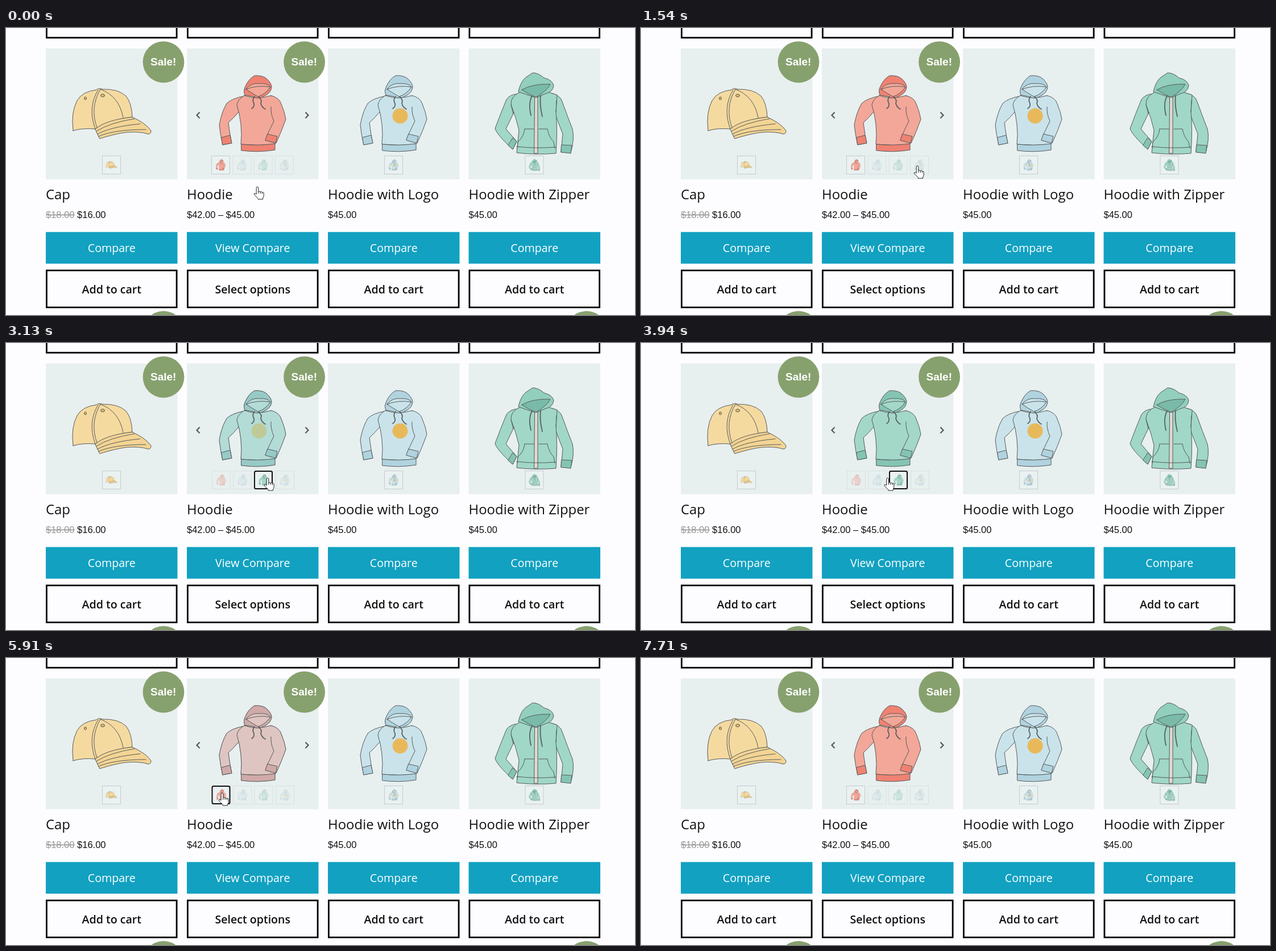
Write an HTML page that moves like this. It is 1106 px wide and 506 px high and loops after 7.75 s.

```html
<!DOCTYPE html>
<html lang="en">
<head>
<meta charset="utf-8">
<title>Shop</title>
<style>
html, body { margin: 0; width: 100%; height: 100%; overflow: hidden; background: #fdfdff; }
svg { display: block; }
text { font-family: "Open Sans", "Noto Sans", sans-serif; fill: #111; }
.title { font-size: 23.9px; }
.price, .sale { font-family: "Liberation Sans", Arial, sans-serif; }
.price { font-size: 16.5px; }
.old { fill: #999; text-decoration: line-through; }
.sale { font-size: 19px; font-weight: 700; fill: #fff; }
.button { font-size: 19.6px; text-anchor: middle; }
.art { stroke: #565b5c; stroke-width: 1; stroke-linejoin: round; stroke-linecap: round; }
.line { fill: none; }
.cord { fill: none; stroke-width: 1.7; }
</style>
</head>
<body>
<svg id="stage" width="1106" height="506" viewBox="0 0 1106 506"></svg>
<script>
const LOOP = 7750, SIZE = 231.5, TOP = 36;
const COLS = [70, 318, 566, 813.5];
const THUMBS = [361, 398.5, 435.5, 473];

const path = (d, fill) => `<path d="${d}" ${fill ? `fill="${fill}"` : 'class="line"'}/>`;
const cord = d => `<path d="${d}" class="cord"/>`;
const use = (id, x, y, scale = 1) =>
  `<use href="#${id}" transform="translate(${x} ${y}) scale(${scale})"/>`;
const art = (id, x, body) =>
  `<g id="${id}" class="art"><g transform="translate(${-x} ${-TOP})">${body}</g></g>`;

function hoodie(id, light, dark, badge) {
  return art(id, COLS[1],
    path('M419 120Q397 124 388 133Q379 148 375 171Q377 190 381 206L397 203Q394 190 391 167Q401 158 410 147Z', light) +
    path('M379 193L394 189L397 203L381 206Z', dark) +
    path('M419 119Q407 126 406 136Q411 151 413 170Q415 188 413 205Q443 208 473 205Q473 160 469 140L466 119Q441 127 419 119Z', light) +
    path('M414 205Q443 208 473 204L473 215Q443 220 414 216Z', dark) +
    path('M466 119Q481 123 484 134Q490 148 492 161Q485 181 475 203L457 198L460 187L471 164Q465 151 466 139', light) +
    path('M460 187L477 191L474 203L456 198Z', dark) +
    path('M420 118Q417 112 420 105Q426 90 437 84Q452 83 459 90Q467 98 467 104Q466 114 456 119Q444 127 434 121Z', dark) +
    path('M422 108Q431 96 446 98Q460 97 465 104Q456 117 443 121Q431 114 422 108Z', light) +
    path('M422 108Q442 100 465 104') +
    cord('M437 121Q432 127 436 133Q437 139 432 142M444 121Q451 127 448 133Q450 140 456 143') +
    (badge ? '<circle cx="445" cy="155" r="13.5" fill="#e8b95a" stroke="none"/>' : ''));
}

const zipHoodie = art('zip', COLS[3],
  path('M900 116Q886 117 880 126Q870 150 860 177Q862 187 891 214L898 200L879 178L892 151Z', '#a0d7c7') +
  path('M891 194L898 200L891 214L883 207Z', '#84c4b2') +
  path('M960 115Q975 119 978 130Q987 155 996 178Q1000 195 993 220L976 219L979 187L966 153Z', '#a0d7c7') +
  path('M977 206L995 207L993 221L976 219Z', '#84c4b2') +
  path('M904 113Q887 120 888 135Q897 158 902 180L898 220Q932 224 967 221Q970 178 967 148L969 118L950 112Z', '#a0d7c7') +
  path('M901 112Q905 94 914 87L926 79Q936 79 946 88Q960 91 963 101Q962 113 948 116L932 123L914 117Z', '#92cfbd') +
  path('M907 109Q925 98 957 99Q951 111 932 122Q917 116 907 109Z', '#79bba8') +
  path('M930 122L935 122L935 221L929 221Z', '#e2d9d2') +
  path('M912 178L928 178M912 178Q911 191 900 201L899 212M937 178L952 178Q954 191 963 201L965 212' +
    'M898 209Q931 213 967 210M888 135L892 151M967 148L968 128') +
  cord('M925 120Q918 132 923 154M940 119Q938 135 943 156'));

const cap = art('cap', COLS[0],
  path('M118 181Q114 149 125 128Q134 112 159 109Q163 105 170 108Q197 107 211 120Q221 132 222 157Q190 160 157 178Q135 176 118 181Z', '#f5daa0') +
  path('M157 178Q176 162 222 157Q246 168 255 181Q255 187 250 187Q236 182 211 184Q190 187 165 195Z', '#f3d494') +
  path('M162 109Q143 140 157 178M166 108Q147 140 160 176M166 108Q199 120 206 158M159 182Q182 167 226 160' +
    'M161 187Q184 174 236 169M163 191Q190 179 246 179') +
  '<ellipse cx="139.5" cy="124" rx="2" ry="2.5" fill="#e0b868"/><ellipse cx="170" cy="119" rx="3.5" ry="2.5" fill="#e0b868"/>');

const badge = (x, y) => `<circle cx="${x}" cy="${y}" r="36.4" fill="#87a16e"/>`;
const sale = x => badge(x, 60) + `<text class="sale" x="${x - 23}" y="66.3">Sale!</text>`;
const thumb = (id, x) =>
  `<rect x="${x + .5}" y="225.5" width="32" height="32" fill="#eaf1f1" stroke="#c5cccd"/>` + use(id, x, 225, .143);
const chevron = (x, dir) =>
  `<path d="M${x - 2.5 * dir} 148.5l${5 * dir} 5.2l${-5 * dir} 5.2" fill="none" stroke="#54585c" stroke-width="2.2"/>`;

function product(i, name, price, compare, action) {
  const x = COLS[i], mid = x + SIZE / 2;
  const box = y => `<rect x="${x + 1.4}" y="${y + 1.4}" width="${SIZE - 2.8}" height="65.2" fill="none" stroke="#000" stroke-width="2.8"/>`;
  return box(-49.5) + box(426) +
    `<rect x="${x}" y="${TOP}" width="${SIZE}" height="230.7" fill="#e8efef"/>
    <text class="title" x="${x}" y="301.5">${name}</text>
    <text class="price" x="${x}" y="334.5">${price}</text>
    <rect x="${x}" y="359.7" width="${SIZE}" height="55.8" fill="#12a1c1"/>
    <text class="button" x="${mid}" y="395.3" style="fill:#fff">${compare}</text>
    <text class="button" x="${mid}" y="468" font-weight="600">${action}</text>`;
}

const SLIDES = ['red', 'blue', 'green', 'logo'];
const stage = document.getElementById('stage');
stage.innerHTML = `<defs>
  ${hoodie('red', '#f3a798', '#ef8272')}${hoodie('blue', '#cae3ea', '#b0d3df')}
  ${hoodie('green', '#a3d8c9', '#84c4b3')}${hoodie('logo', '#cae3ea', '#b0d3df', true)}
  ${zipHoodie}${cap}</defs>` +
  product(0, 'Cap', '<tspan class="old">$18.00</tspan> $16.00', 'Compare', 'Add to cart') +
  product(1, 'Hoodie', '$42.00 – $45.00', 'View Compare', 'Select options') +
  product(2, 'Hoodie with Logo', '$45.00', 'Compare', 'Add to cart') +
  product(3, 'Hoodie with Zipper', '$45.00', 'Compare', 'Add to cart') +
  use('cap', COLS[0], TOP) + use('logo', COLS[2], TOP) + use('zip', COLS[3], TOP) +
  thumb('cap', 169) + thumb('logo', 665) + thumb('zip', 912.5) +
  SLIDES.map(id => `<g class="slide">${use(id, COLS[1], TOP)}</g>`).join('') +
  chevron(338, -1) + chevron(529, 1) +
  SLIDES.map((id, i) => `<g class="thumb">${thumb(id, THUMBS[i])}</g>`).join('') +
  `<rect id="focus" y="226" width="31" height="31" rx="2.5" fill="none" stroke="#111" stroke-width="2"/>` +
  sale(277) + sale(524.6) + badge(277, 535.5) + badge(1020.6, 535.5) +
  `<g id="hand" stroke="#222" stroke-width="1" stroke-linejoin="round">
    <path fill="#fff" d="M-1.8 13V1.8a1.8 1.8 0 0 1 3.6 0V8.5q1.8-1.6 3.4.4 1.8-1.2 3.2.6 2.4-.8 2.8 1.6V15.5q0 2.5-1.6 4.5V22H1.2V20.5L-5.6 13.6q-.6-2.8 1.8-1.8z"/>
    <path fill="none" d="M1.8 8.5V12M5.2 9V12M8.4 10V12.5"/></g>`;

const slides = stage.querySelectorAll('.slide'), thumbs = stage.querySelectorAll('.thumb');
const focus = document.getElementById('focus'), hand = document.getElementById('hand');

// Clicks: time, chosen slide
const CLICKS = [[-1000, 0], [1790, 3], [2960, 2], [4530, 1], [5760, 0]];
const FADE = 300, BLUR = 7420;
// Pointer stops: time, x, y of the fingertip
const MOVES = [[130, 442, 280], [780, 486, 243], [2250, 486, 243], [2800, 460, 238], [3550, 460, 238],
  [4250, 415, 238], [5050, 415, 238], [5550, 380, 238], [6350, 380, 238], [7050, 392, 512]];

const clamp = v => Math.max(0, Math.min(1, v));
const ease = v => v * v * (3 - 2 * v);

function pointer(t) {
  const last = MOVES.at(-1);
  if (t >= last[0]) return last.slice(1);
  const i = Math.max(1, MOVES.findIndex(m => m[0] > t));
  const [t0, x0, y0] = MOVES[i - 1], [t1, x1, y1] = MOVES[i];
  const k = ease(clamp((t - t0) / (t1 - t0)));
  return [x0 + (x1 - x0) * k, y0 + (y1 - y0) * k];
}

// While fading, the lower slide stays solid and the upper one blends over it.
function fade(i, now, before, p) {
  if (p === 1) return i === now ? 1 : 0;
  if (i === Math.min(now, before)) return 1;
  return i === now ? p : i === before ? 1 - p : 0;
}

function draw(t) {
  const n = CLICKS.findLastIndex(c => c[0] <= t);
  const [start, now] = CLICKS[n], before = n ? CLICKS[n - 1][1] : now;
  const p = clamp((t - start) / FADE);
  const focused = n > 0 && t < BLUR;
  slides.forEach((s, i) => s.setAttribute('opacity', fade(i, now, before, p)));
  thumbs.forEach((s, i) => {
    s.setAttribute('opacity', i === now ? 1 : .4);
    s.setAttribute('transform', `translate(${focused ? 1 : 0} 0)`);
  });
  focus.setAttribute('x', THUMBS[now] + 1.5);
  focus.setAttribute('visibility', focused ? 'visible' : 'hidden');
  hand.setAttribute('transform', `translate(${pointer(t)})`);
}

const begin = performance.now();
function tick() {
  draw((performance.now() - begin) % LOOP);
  requestAnimationFrame(tick);
}
tick();
</script>
</body>
</html>
```
